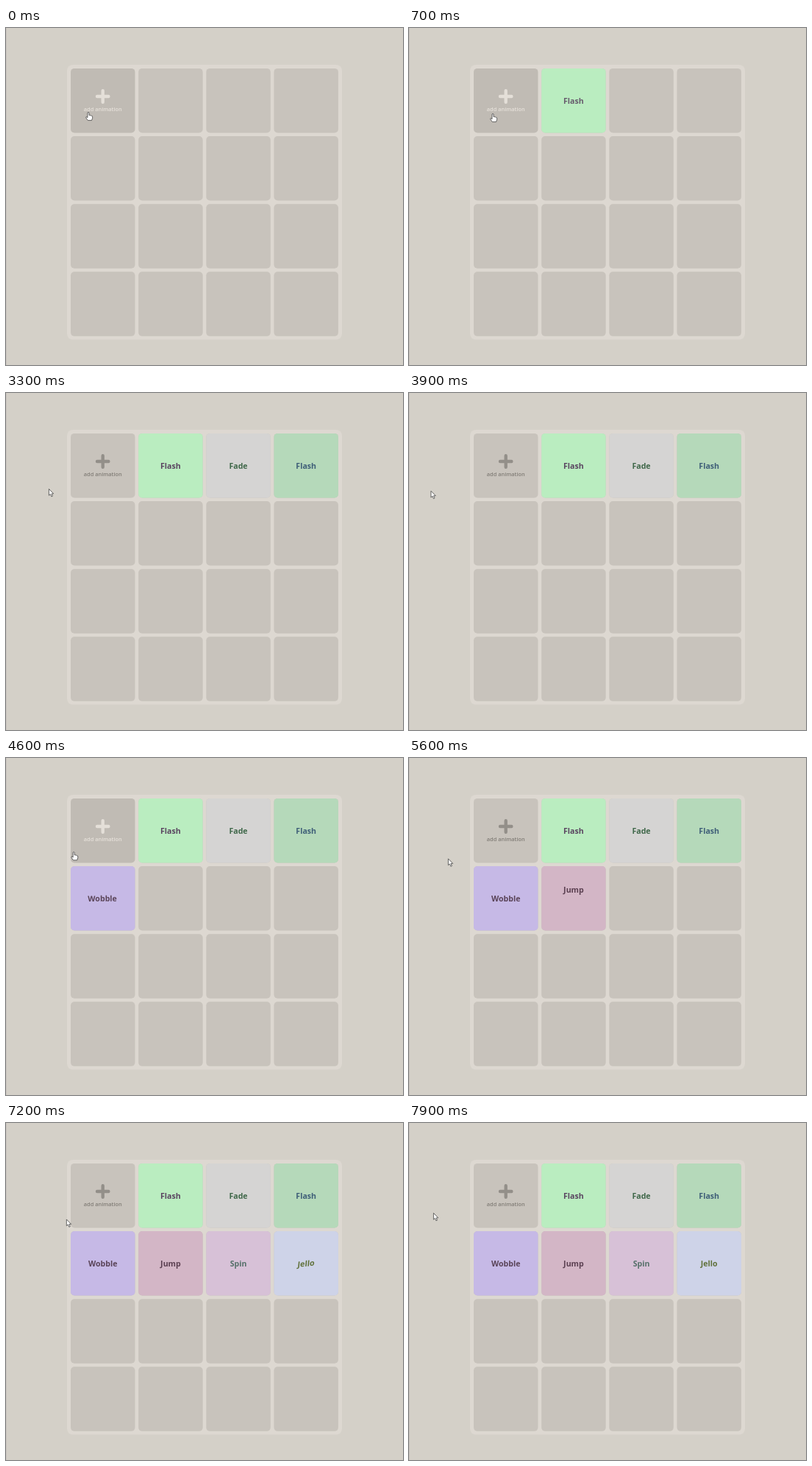
An HTML page that plays this animation: 540x458 px, repeating every 8000 ms.

```html
<!DOCTYPE html>
<html lang="en">
<head>
<meta charset="utf-8">
<title>Animated tiles</title>
<style>
  html, body { margin: 0; width: 100%; height: 100%; overflow: hidden; background: #d4d0c8; }
  svg { display: block; width: 100%; height: 100%; }
  text { font-family: "Open Sans", "Noto Sans", sans-serif; text-anchor: middle; }
  .label { font-size: 10.6px; font-weight: 700; }
  .hint { font-size: 7.4px; font-weight: 600; }
</style>
</head>
<body>
<svg id="stage" viewBox="0 0 540 458"></svg>
<script>
const LOOP = 8000, STEP = 100, EFFECT = 1000;
const CELL = 87.5, PITCH = 92.15, LEFT = 88, TOP = 54.9;
const { PI, sin, cos, abs, exp, floor, min, max } = Math;
const stage = document.getElementById('stage');

function add(parent, tag, attrs, content) {
  const el = document.createElementNS('http://www.w3.org/2000/svg', tag);
  for (const k in attrs) el.setAttribute(k, attrs[k]);
  if (content) el.textContent = content;
  return parent.appendChild(el);
}

const easeOut = p => sin(p * PI / 2);
const glide = p => (1 - cos(p * PI)) / 2;

// Each effect maps progress 0..1 to an opacity and a transform
const effects = {
  Flash: p => ({ opacity: (1 + cos(4 * PI * p)) / 2 }),
  Fade: p => ({ opacity: easeOut(p) }),
  Wobble: p => {
    const s = -(1 - p) * sin(6 * PI * p);
    return { move: `translate(${12 * s} 0) rotate(${5 * s})` };
  },
  Jump: p => ({ move: `translate(0 ${-20 * (1 - p) ** 2 * abs(sin(2 * PI * p))})` }),
  Spin: p => ({ move: `rotate(${-360 * easeOut(p)})` }),
  Jello: p => {
    const a = -15 * exp(-5 * p) * sin(9 * PI * p);
    return { move: `skewX(${a}) skewY(${a})` };
  }
};

// name, start, tile colour, text colour
const tiles = [
  ['Flash', 260, '#baedc0', '#5a4560'],
  ['Fade', 1350, '#d5d4d3', '#40684a'],
  ['Flash', 2300, '#b5d9ba', '#3f5f78'],
  ['Wobble', 4597, '#c6b9e6', '#5a4458'],
  ['Jump', 5400, '#d3b6c6', '#5a3f50'],
  ['Spin', 6200, '#d7c1d7', '#557069'],
  ['Jello', 7110, '#ced3e8', '#5f7038']
];

// The pointer rests on the button, then swings out and back: time, x, y of its tip
const path = [
  [100, 112, 114], [500, 114, 116], [2900, 114, 117], [3300, 58, 130],
  [3700, 54, 134], [4050, 14, 132], [4550, 95, 127], [5000, 0, 136],
  [5450, 96, 133], [5750, 10, 140], [6000, 95, 137], [6150, 95, 137],
  [6700, 8, 176], [7100, 96, 131], [7500, 0, 128], [7900, 33, 122]
];

function pointerAt(t) {
  const i = path.findIndex(key => key[0] > t);
  if (i < 1) return path.at(i).slice(1);
  const [t0, x0, y0] = path[i - 1], [t1, x1, y1] = path[i];
  const f = glide((t - t0) / (t1 - t0));
  return [x0 + (x1 - x0) * f, y0 + (y1 - y0) * f];
}

const cellX = i => LEFT + (i % 4) * PITCH;
const cellY = i => TOP + floor(i / 4) * PITCH;
const square = (i, fill) => add(stage, 'rect',
  { x: cellX(i), y: cellY(i), width: CELL, height: CELL, rx: 5, fill });

add(stage, 'rect', { width: 540, height: 458, fill: '#d4d0c8' });
add(stage, 'rect', { width: 1, height: 458, fill: '#c9c4be' });
add(stage, 'rect', { x: 83, y: 50, width: 374, height: 373.5, rx: 8, fill: '#ddd8d1' });
const cells = Array.from({ length: 16 }, (_, i) => square(i, '#c8c3bc'));

const plus = add(stage, 'path',
  { d: 'M124 93h15.4M131.7 85.3v15.4', 'stroke-width': 4.4, 'stroke-linecap': 'round' });
const hint = add(stage, 'text', { x: 131.8, y: 113, class: 'hint' }, 'add animation');

const shown = tiles.map(([name, start, back, fill], i) => {
  const box = square(i + 1, back);
  const group = add(stage, 'g', {});
  add(group, 'text', { y: 4, class: 'label', fill }, name);
  const center = `translate(${cellX(i + 1) + CELL / 2} ${cellY(i + 1) + CELL / 2})`;
  return { name, start, box, group, center };
});

const line = { fill: '#fff', stroke: '#444', 'stroke-width': .8, 'stroke-linejoin': 'round' };
const arrow = add(stage, 'path',
  { ...line, d: 'M.4.4V9.2L2.4 7.4 3.9 10.8 5.4 10.1 4 6.9H6.7Z' });
const hand = add(stage, 'path', { ...line,
  d: 'M-1 1Q0-.2 1 1V4.6Q2 4 2.8 5Q3.8 4.5 4.4 5.5Q5.6 5.2 5.6 6.6V8.6L4.5 11.6H-.6L-3.2 8Q-3.6 6.4-2.2 6.7L-1 7.8Z' });

const show = (el, on) => el.setAttribute('visibility', on ? 'visible' : 'hidden');

function draw(t) {
  const [x, y] = pointerAt(t);
  const over = x >= LEFT && x <= LEFT + CELL && y >= TOP && y <= TOP + CELL;

  cells[0].setAttribute('fill', over ? '#c0bbb4' : '#c8c3bc');
  plus.setAttribute('stroke', over ? '#e4dfd8' : '#938f89');
  hint.setAttribute('fill', over ? '#e6e1da' : '#817d77');

  for (const { name, start, box, group, center } of shown) {
    const p = min(1, max(0, (t - start) / EFFECT));
    const { opacity = 1, move = '' } = effects[name](p);
    show(box, t >= start);
    show(group, t >= start);
    group.setAttribute('opacity', opacity);
    group.setAttribute('transform', `${center} ${move}`);
  }

  show(hand, over);
  show(arrow, !over);
  for (const el of [hand, arrow]) el.setAttribute('transform', `translate(${x} ${y})`);
}

const begin = performance.now();
function tick() {
  const t = (performance.now() - begin) % LOOP;
  draw(floor(t / STEP) * STEP);
  requestAnimationFrame(tick);
}
tick();
</script>
</body>
</html>
```
